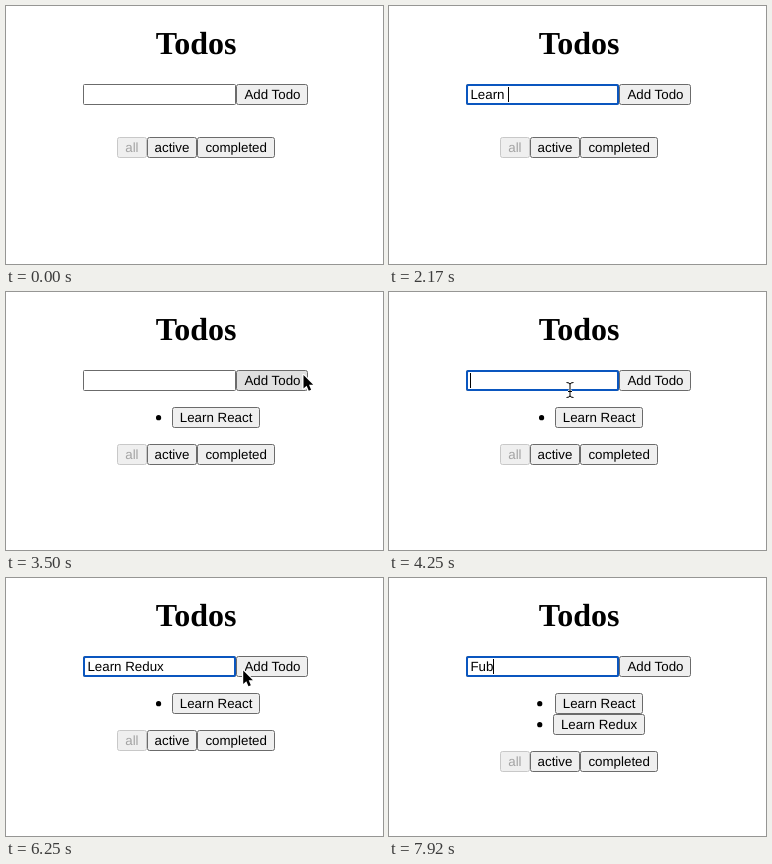
Animation of 377 by 258 pixels, one loop 8000 ms. Source, as an HTML page:

```html
<!DOCTYPE html>
<html lang="en">
<head>
<meta charset="utf-8">
<title>Todos</title>
<style>
  html, body { margin: 0; width: 100%; height: 100%; overflow: hidden; background: #fff; }
  svg { display: block; }
  text { font: 13.333px Arial, "Liberation Sans", sans-serif; white-space: pre; text-rendering: geometricPrecision; }
  .title { font: bold 32px "Liberation Serif", Times, serif; text-anchor: middle; }
  .button rect { fill: #efefef; stroke: #6b6b6b; }
  .button.hover rect { fill: #e0e0e0; }
  .button.off rect { stroke: #c8c8c8; }
  .button.off text { fill: #a3a3a3; }
  #field { fill: #fff; stroke: #6b6b6b; }
  #ring { fill: #fff; stroke: #0a56bf; stroke-width: 2; }
  .halo { fill: none; stroke: #fff; stroke-width: 2.4; stroke-linejoin: round; }
  .beam { fill: none; stroke: #000; }
</style>
</head>
<body>
<svg width="377" height="258" viewBox="0 0 377 258">
  <defs>
    <path id="tip" d="M0 0V13.6L3.1 10.7L5.3 15.7L7.6 14.7L5.5 9.8H9.7Z"/>
    <path id="bar" d="M-3.5-7.5Q0-7.5 0-5.5V5.5Q0 7.5-3.5 7.5M3.5-7.5Q0-7.5 0-5.5M3.5 7.5Q0 7.5 0 5.5M-2 1.5H2"/>
  </defs>
  <text class="title" x="190.1" y="48">Todos</text>
  <rect id="field" x="77.5" y="78.5" width="152" height="20" rx="1"/>
  <g id="add"></g>
  <rect id="ring" x="78" y="79" width="151" height="19" rx="1.5"/>
  <text id="typed" x="81.45" y="93"></text>
  <rect id="caret" y="81" width="1" height="15"/>
  <g id="list"></g>
  <g id="filters"></g>
  <g id="arrow"><use href="#tip" class="halo"/><use href="#tip"/></g>
  <g id="ibeam"><use href="#bar" class="halo"/><use href="#bar" class="beam"/></g>
</svg>
<script>
const LOOP = 8000, TICKS_PER_MS = 0.012, BLINK = 6, CENTER = 190.1, ROW = 21;
const $ = id => document.getElementById(id);
const show = (el, on) => el.setAttribute("visibility", on ? "visible" : "hidden");
const move = (el, x, y) => el.setAttribute("transform", `translate(${x} ${y})`);

// Times are in ticks. Each "|" in keys lets one tick pass.
const rounds = [
  { focus: 12, type: 21, send: 41, keys: "L||ea||rn| ||R|||e|a|c|t" },
  { focus: 49, type: 56, send: 78, keys: "L||e|a|r|n| |R||e||du||x" },
  { focus: 82, type: 90, keys: "F||u|||b" }
];

// Each move starts where the one before it ended.
const origin = [345, 78];
const moves = [
  { from: 8, until: 14, bend: [270, 66], to: [192, 82] },
  { from: 33, until: 41, bend: [382, 53], to: [297.5, 83] },
  { from: 43, until: 49, bend: [230, 92], to: [181, 98] },
  { from: 72, until: 77, bend: [209, 101], to: [250, 89] },
  { from: 78, until: 83, bend: [205, 88], to: [160, 92] }
];

function measure(text) {
  $("typed").textContent = text;
  return $("typed").getComputedTextLength();
}

const buttonWidth = label => measure(label) + 16;

function button(x, y, label, cls = "") {
  const left = Math.round(x), right = Math.round(x + buttonWidth(label));
  return `<g class="button ${cls}"><rect x="${left + .5}" y="${y + .5}" width="${right - left - 1}" height="20" rx="2"/>` +
    `<text x="${x + 8}" y="${y + 15}">${label}</text></g>`;
}

function typing(round, tick) {
  if (!round || tick >= round.send) return null;
  const keys = round.keys.split("|").slice(0, Math.max(0, tick - round.type + 1));
  const lastKey = keys.findLastIndex(k => k);
  return { text: keys.join(""), since: lastKey < 0 ? round.focus : round.type + lastKey };
}

function pointerAt(tick, round) {
  const i = moves.findLastIndex(m => m.from <= tick);
  if (i < 0) return null;
  const { from, until, bend, to } = moves[i];
  if (round && tick >= round.type && from < round.type) return null;  // typing hides the pointer
  const start = i ? moves[i - 1].to : origin;
  const rest = (1 - Math.min(1, (tick - from) / (until - from))) ** 2, f = 1 - rest;
  const [x, y] = [0, 1].map(a => rest * rest * start[a] + 2 * f * rest * bend[a] + f * f * to[a]);
  return { x, y };
}

function draw(tick) {
  const round = rounds.findLast(r => r.focus <= tick);
  const sent = rounds.filter(r => r.send <= tick).map(r => r.keys.replaceAll("|", ""));
  const left = CENTER + 20 - Math.max(...sent.map(buttonWidth)) / 2;
  $("list").innerHTML = sent.map((label, n) =>
    `<circle cx="${left - 13.2}" cy="${125.7 + ROW * n}" r="2.6"/>` +
    button(CENTER + 20 - buttonWidth(label) / 2, 115 + ROW * n, label)).join("");
  move($("filters"), 0, ROW * sent.length);

  const entry = typing(round, tick);
  $("caret").setAttribute("x", Math.floor(81.45 + measure(entry ? entry.text : "")));
  show($("ring"), entry);
  show($("caret"), entry && (tick - entry.since) % (2 * BLINK) < BLINK);

  const p = pointerAt(tick, round);
  const inRow = p && p.y >= 78 && p.y < 99;
  const overField = inRow && p.x >= 77 && p.x < 230;
  show($("arrow"), p && !overField);
  show($("ibeam"), overField);
  if (p) move($(overField ? "ibeam" : "arrow"), p.x, p.y);
  $("add").firstChild.classList.toggle("hover", !!inRow && p.x >= 240 && p.x < 303);
}

$("add").innerHTML = button(230.4, 78, "Add Todo");
const filters = ["all", "active", "completed"];
let x = CENTER - filters.reduce((sum, label) => sum + buttonWidth(label), 0) / 2;
for (const label of filters) {
  $("filters").innerHTML += button(x, 131, label, label === "all" ? "off" : "");
  x += buttonWidth(label);
}

const start = performance.now();
let last = -1;
function frame() {
  const tick = Math.floor(((performance.now() - start) % LOOP + 4) * TICKS_PER_MS);
  if (tick !== last) draw(last = tick);
  requestAnimationFrame(frame);
}
frame();
</script>
</body>
</html>
```
